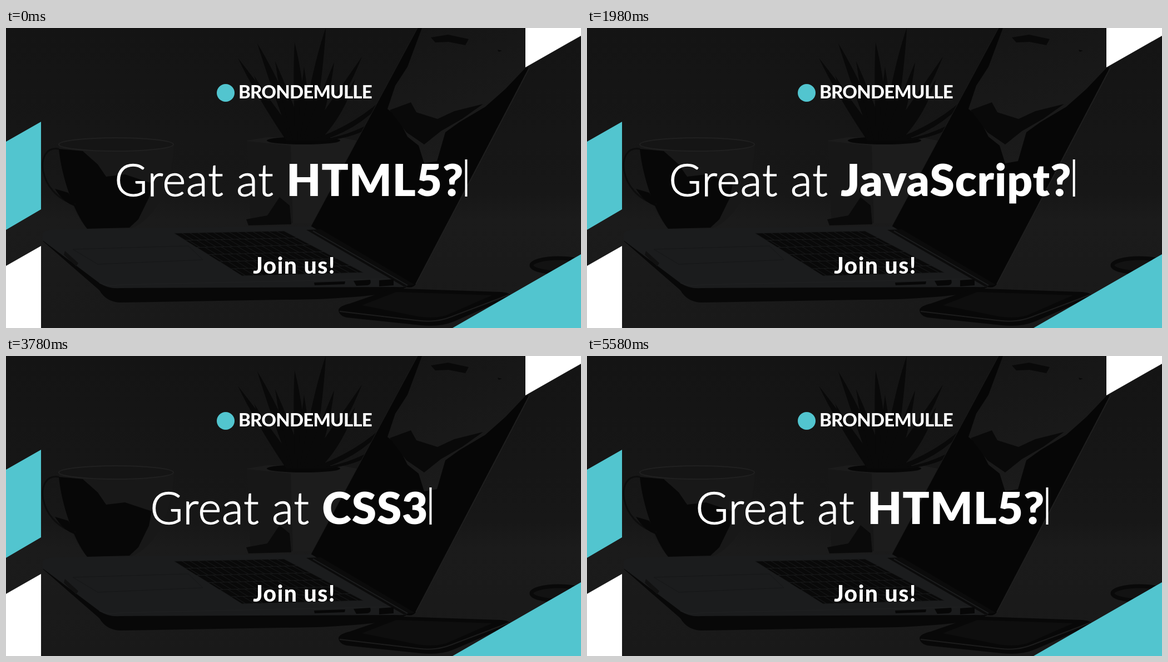
Write an HTML page that moves like this. It is 1034 px wide and 541 px high and loops after 6120 ms.

```html
<!DOCTYPE html>
<html lang="en">
<head>
<meta charset="utf-8">
<title>Typing banner</title>
<style>
  html, body { margin: 0; width: 100%; height: 100%; overflow: hidden; background: #171717; }
  svg { display: block; width: 100%; height: 100%; }
  text { font-family: Lato, "Open Sans", sans-serif; fill: #fff; white-space: pre; }
  #line { font-size: 80px; font-weight: 300; letter-spacing: .9px; stroke: #fff; stroke-width: 1.5px; }
  #word { font-weight: 900; letter-spacing: .9px; stroke: none; }
</style>
</head>
<body>
<svg viewBox="0 0 1034 541" preserveAspectRatio="none">
  <defs>
    <linearGradient id="room" x2="0" y2="1">
      <stop offset="0" stop-color="#141414"/>
      <stop offset=".55" stop-color="#171717"/>
      <stop offset=".64" stop-color="#1b1b1b"/>
      <stop offset="1" stop-color="#191919"/>
    </linearGradient>
    <linearGradient id="glare" x2=".3" y2="1">
      <stop offset="0" stop-color="#151515"/>
      <stop offset="1" stop-color="#1b1b1b"/>
    </linearGradient>
  </defs>
  <rect width="1034" height="541" fill="url(#room)"/>

  <!-- cup -->
  <path d="M95 211C97 270 118 330 145 361H225C270 345 300 280 302 211Z" fill="#181818"/>
  <path d="M95 218L138 222L165 246L180 268L214 264L262 280L257 306L238 345L222 360L146 362C122 332 100 270 95 218Z" fill="#070707"/>
  <path d="M95 218C50 210 55 300 125 318" fill="none" stroke="#0d0d0d" stroke-width="3"/>
  <path d="M88 290L112 297L126 322Q104 316 88 290Z" fill="#070707"/>
  <ellipse cx="198" cy="210" rx="103" ry="12" fill="#151515" stroke="#202020" stroke-width="2"/>

  <!-- plant and pot -->
  <path d="M433 203L470 197H600L640 205L612 352H440Z" fill="#1c1c1c"/>
  <path d="M433 204L512 212L516 352L440 350Z" fill="#171717"/>
  <path d="M432 345L470 338L492 305L510 320L513 354L436 356Z" fill="#0a0a0a"/>
  <ellipse cx="535" cy="203" rx="66" ry="7" fill="#070707"/>
  <g id="leaves" fill="#090909"></g>

  <!-- laptop lid -->
  <path d="M740 0H934V71L941 72L737 462Q731 470 720 467L548 358Z" fill="#060606"/>
  <path d="M748 0H934V72L898 110L862 142L815 170L790 188L775 240L752 244L742 212L722 196L704 160L686 146L700 104L722 70Z" fill="url(#glare)"/>
  <path d="M764 17L795 12L832 20L826 31L796 25L772 26ZM884 39L892 41L886 43ZM690 148L728 134L738 152L776 164L806 150L858 137L820 164L782 186L752 210L720 188Z" fill="#090909"/>
  <path d="M740 0L548 358" stroke="#1a1a1a"/>
  <path d="M941 72L737 462" stroke="#1e1e1e" stroke-width="2"/>

  <!-- laptop base -->
  <path d="M66 384L168 473Q180 494 205 495L560 489Q700 483 722 466L548 358Z" fill="#080808"/>
  <path d="M66 371Q68 364 90 363L548 357L724 463Q722 468 700 467L205 469Q185 471 168 460L66 383Z" fill="#1b1c1d"/>
  <path d="M168 460Q186 467 205 463L705 452" fill="none" stroke="#202122"/>
  <path d="M120 399L328 393L354 418L165 426Z" fill="none" stroke="#151617"/>
  <path d="M106 402L130 424L126 430L104 409Z" fill="#111"/>
  <path d="M302 370L500 366L643 441L425 447Z" fill="#090909"/>
  <g id="keys" fill="none" stroke="#191a1b"></g>
  <path d="M540 364L566 363L735 463L715 466Z" fill="#0b0b0b"/>
  <path d="M552 366L722 464" stroke="#1c1d1e" stroke-width="2"/>
  <path d="M554 459L610 457L609 462L555 464ZM625 456L655 454Q658 462 650 464L630 465ZM671 455L697 453V464L671 466Z" fill="#070707"/>

  <!-- phone and ring -->
  <path d="M598 508Q600 501 618 497L690 472Q698 469 712 470L890 476Q912 478 905 486L806 529Q780 540 745 536L612 522Q598 518 598 508Z" fill="#080808"/>
  <path d="M640 500L702 476L874 482L792 518Q770 525 740 520Z" fill="#0e0e0e"/>
  <path d="M600 511L745 528Q775 531 800 521L905 481" fill="none" stroke="#1c1c1c" stroke-width="2"/>
  <ellipse cx="994" cy="428" rx="49" ry="13" fill="#121212" stroke="#090909" stroke-width="7"/>

  <!-- corner shapes -->
  <path d="M0 205L63 169V327L0 364ZM1034 408V541H803Z" fill="#52c5cf"/>
  <path d="M0 429L63 393V541H0ZM934 0H1034V14L934 71Z" fill="#fff"/>

  <circle cx="395" cy="117" r="16" fill="#52c5cf"/>
  <text x="418" y="127" font-size="33" font-weight="800" letter-spacing="-.8">BRONDEMULLE</text>
  <text x="518.5" y="443" font-size="41" font-weight="800" letter-spacing="1.4" text-anchor="middle">Join us!</text>
  <text id="line" y="303">Great at <tspan id="word"></tspan></text>
  <rect id="caret" y="237" width="4" height="67" fill="#fff"/>
</svg>
<script>
const $ = id => document.getElementById(id);
const LOOP = 6120;

// start, ms per letter, word, direction
const edits = [
  [-LOOP, 1, 'HTML5?', 1],
  [60, 60, 'HTML5?', -1],
  [780, 120, 'JavaScript?', 1],
  [2520, 60, 'JavaScript?', -1],
  [3420, 120, 'CSS3?', 1],
  [4440, 60, 'CSS3?', -1],
  [4980, 120, 'HTML5?', 1]
];

const path = d => `<path d="${d}"/>`;

// leaf tips, fanned out from the pot
const tips = [[417, 54], [446, 86], [452, 28], [484, 60], [519, 26], [536, 70], [575, 0],
              [590, 62], [640, 52], [628, 92], [694, 112], [708, 132]];
$('leaves').innerHTML = tips.map(([x, y], i) => {
  const base = 514 + i * 4, bend = base + (x - base) * .6, mid = y + 65;
  return path(`M${base - 10} 203Q${bend - 8} ${mid} ${x} ${y}Q${bend + 12} ${mid} ${base + 14} 203Z`);
}).join('');

// keyboard grid in perspective
const at = (u, v) => [302 + 198 * u + (123 + 20 * u) * v, 370 - 4 * u + (77 - 2 * u) * v];
let grid = '';
for (let r = 0; r <= 6; r++) grid += `M${at(0, r / 6)}L${at(1, r / 6)}`;
for (let r = 0; r < 6; r++)
  for (let c = 0; c <= 14; c++) {
    const u = Math.min(1, (c + r % 2 * .4) / 14);
    grid += `M${at(u, r / 6)}L${at(u, (r + 1) / 6)}`;
  }
$('keys').innerHTML = path(grid);

function typed(t) {
  const [start, step, word, dir] = edits.findLast(e => e[0] <= t);
  const n = Math.min(word.length, Math.floor((t - start) / step) + 1);
  return word.slice(0, dir > 0 ? n : word.length - n);
}

function draw() {
  $('word').textContent = typed(performance.now() % LOOP);
  const width = $('line').getComputedTextLength();
  const x = 509.5 - width / 2;
  $('line').setAttribute('x', x);
  $('caret').setAttribute('x', x + width + 2);
  requestAnimationFrame(draw);
}
draw();
</script>
</body>
</html>
```
